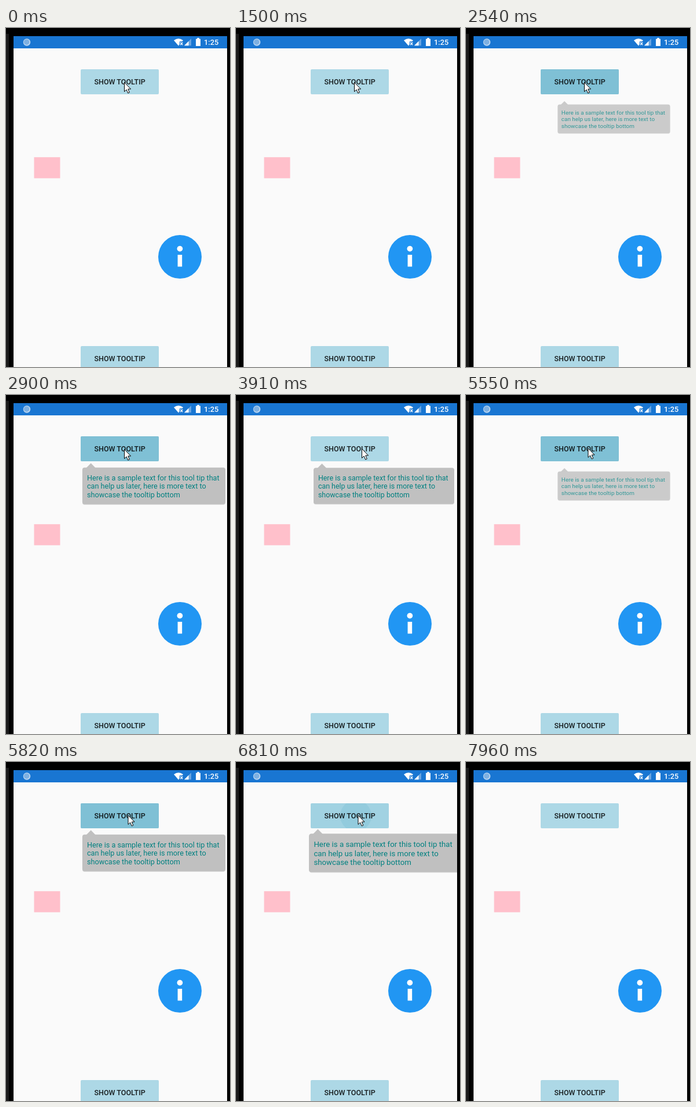
These frames come from a looping animation (387 px wide and 583 px high, 8.29 s). An HTML page:

```html
<!DOCTYPE html>
<html lang="en">
<head>
<meta charset="utf-8">
<title>Tooltip demo</title>
<style>
  html, body { margin: 0; width: 100%; height: 100%; overflow: hidden; background: #000; }
  svg { display: block; width: 387px; height: 583px; font-family: Roboto, sans-serif; font-size: 12.45px; }
  .label { font-size: 12.5px; font-weight: 500; fill: #000; fill-opacity: .87; text-anchor: middle; }
</style>
</head>
<body>
<svg viewBox="0 0 387 583">
  <defs>
    <clipPath id="screen"><rect x="13" y="14" width="369" height="569"/></clipPath>
    <clipPath id="face"><rect x="129" y="71" width="135" height="43" rx="2"/></clipPath>
  </defs>

  <rect width="387" height="583"/>
  <rect y="10" width="5" height="573" fill="#1a1a1a"/>
  <rect x="13" y="14" width="369" height="569" fill="#fafafa"/>

  <!-- status bar -->
  <rect x="13" y="14" width="369" height="21" fill="#1976d2"/>
  <circle cx="36" cy="24.5" r="6.2" fill="#bcd6f0"/>
  <circle cx="35.6" cy="24.2" r="4.8" fill="#7db0e2"/>
  <path d="M290 21.2Q298 15.3 306 21.2L298 30.4Z" fill="#fff"/>
  <rect x="299.8" y="23.2" width="7" height="8" fill="#1976d2"/>
  <path d="M301.2 24.8l4 4.4m0-4.4l-4 4.4" stroke="#fff" stroke-width="1.4"/>
  <path d="M308 30.3L320 18.3V30.3Z" fill="#fff" fill-opacity=".35"/>
  <path d="M308 30.3L315.5 22.8V30.3Z" fill="#fff"/>
  <path d="M328 18.7h2.3v-1.6h3.4v1.6h2.3v12.2h-8z" fill="#fff"/>
  <text x="342" y="29.4" font-size="12.8" font-weight="500" fill="#fff">1:25</text>

  <!-- page -->
  <g clip-path="url(#face)">
    <rect x="129" y="71" width="135" height="43" fill="#add8e6"/>
    <rect id="tint" x="129" y="71" width="135" height="43" fill="#7fc0d5"/>
    <circle id="ripple" cx="207" cy="92.5" r="27" fill="#7fc0d5"/>
  </g>
  <text class="label" x="196.6" y="97.4">SHOW TOOLTIP</text>
  <rect x="48.5" y="222.2" width="45" height="36.2" fill="#ffc0cb"/>
  <circle cx="300.5" cy="393.5" r="37.5" fill="#2196f3"/>
  <circle cx="300.4" cy="379.6" r="4.9" fill="#fff"/>
  <rect x="296.6" y="390" width="7.6" height="20.4" fill="#fff"/>
  <rect x="129" y="547" width="135" height="43" rx="2" fill="#add8e6"/>
  <text class="label" x="196.6" y="573.4">SHOW TOOLTIP</text>

  <g clip-path="url(#screen)">
    <g id="tip">
      <rect x="134" y="126.2" width="243" height="62" rx="4" fill="#000" fill-opacity=".16"/>
      <path d="M140.5 126L148.5 118L156.5 126Z" fill="#c0c0c0"/>
      <rect x="134" y="125.3" width="243" height="61.9" rx="4" fill="#c0c0c0"/>
      <g fill="#008080">
        <text x="141.9" y="146.7">Here is a sample text for this tool tip that</text>
        <text x="141.9" y="161.3">can help us later, here is more text to</text>
        <text x="141.9" y="175.9">showcase the tooltip bottom</text>
      </g>
    </g>
  </g>

  <path id="cursor" d="M.5 .5V16.4L4.1 13L6.7 19L9.3 17.9L6.8 12H11.6Z" fill="#fff" stroke="#000" stroke-linejoin="round"/>
</svg>
<script>
const LOOP = 8290;
const TICK = 122;
const $ = id => document.getElementById(id);
const tint = $('tint'), ripple = $('ripple'), tip = $('tip'), cursor = $('cursor');

const clamp = v => Math.max(0, Math.min(1, v));
const hold = (t, from, step) => from + Math.floor((t - from) / step) * step;

const taps = [970, 4160, 6810];
const presses = [{ down: 2150, up: 3020 }, { down: 5170, up: 5940 }];
const visits = [{ show: 2540, hide: 4160 }, { show: 5550, hide: 6810 }];

// Mouse path: time, x, y
const path = [
  [2960, 204, 93], [3240, 283, 112], [3490, 229, 96], [3760, 217, 92],
  [4540, 217, 92], [4690, 210.5, 91], [7200, 210.5, 91],
  [7240, 216, 106], [7390, 285, 360], [7540, 293, 513], [7810, 347, 572]
];
const GONE = 7960;

const overshoot = p => 1 + (p - 1) ** 2 * (3 * (p - 1) + 2);
const anticipate = p => p * p * (3 * p - 2);

function tipScale(t) {
  const visit = visits.find(v => t >= v.show && t < v.hide + 2 * TICK);
  if (!visit) return 0;
  const { show, hide } = visit;
  if (t < hide) return overshoot(clamp((hold(t, show, TICK) - show + 80) / 360));
  return 1 - anticipate(clamp((hold(t, hide, TICK) - hide + 44) / 198));
}

function mouse(t) {
  const now = hold(t, path[7][0], 150);
  const i = path.findIndex(p => p[0] > now);
  if (i < 0) return path[path.length - 1].slice(1);
  if (i === 0) return path[0].slice(1);
  const [t0, x0, y0] = path[i - 1], [t1, x1, y1] = path[i];
  const k = (now - t0) / (t1 - t0);
  return [x0 + (x1 - x0) * k, y0 + (y1 - y0) * k];
}

function draw(t) {
  const held = presses.some(p => t >= p.down && t < p.up);
  const tapped = taps.some(d => t >= d && t < d + TICK);
  const fading = presses.some(p => t >= p.up && t < p.up + TICK);
  tint.setAttribute('opacity', held ? 1 : tapped ? .26 : 0);
  ripple.setAttribute('opacity', tapped ? .42 : fading ? .18 : 0);

  const s = tipScale(t);
  tip.setAttribute('transform', `translate(255.5 156) scale(${s}) translate(-255.5 -156)`);
  tip.setAttribute('opacity', clamp(s));

  cursor.setAttribute('visibility', t < GONE ? 'visible' : 'hidden');
  cursor.setAttribute('transform', `translate(${mouse(t)})`);
}

const start = performance.now();
function tick() {
  draw((performance.now() - start) % LOOP);
  requestAnimationFrame(tick);
}
tick();
</script>
</body>
</html>
```
